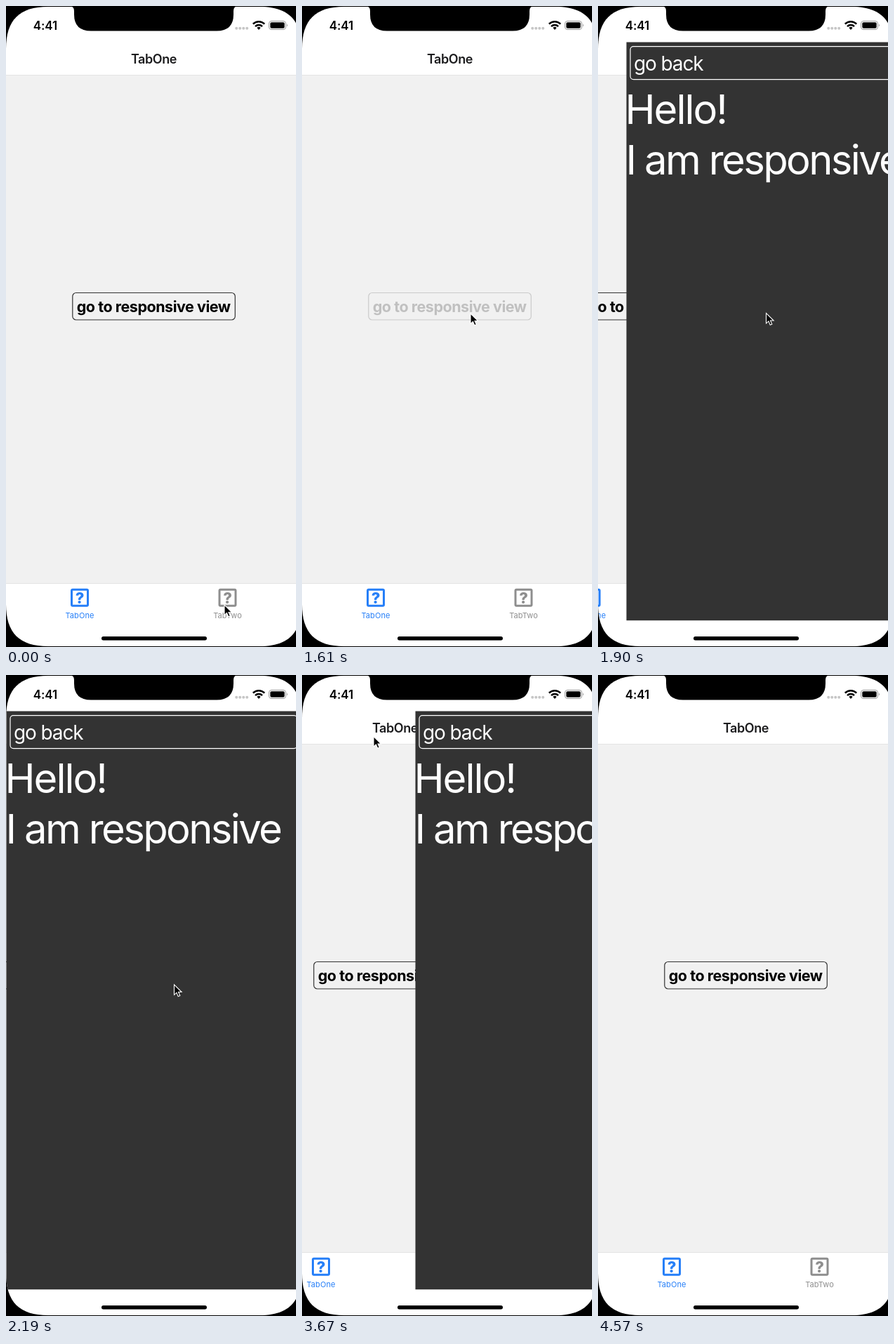
Write an HTML page that moves like this. It is 413 px wide and 913 px high and loops after 4.87 s.

```html
<!DOCTYPE html>
<html lang="en">
<head>
<meta charset="utf-8">
<title>Tab navigation</title>
<style>
  html, body { margin: 0; width: 100%; height: 100%; overflow: hidden; background: #000; }
  svg { display: block; width: 413px; height: 913px; }
  text { font-family: Inter, "Liberation Sans", sans-serif; font-optical-sizing: none; white-space: pre; }
  .mid { text-anchor: middle; }
  .title { font-size: 18px; font-weight: 600; letter-spacing: -.4px; fill: #1c1c1e; }
  .clock { font-size: 17px; font-weight: 600; letter-spacing: -.1px; }
  .label { font-size: 11px; letter-spacing: .08px; }
  .mark { font-size: 22px; font-weight: 800; }
  .link { font-size: 21.5px; font-weight: 700; letter-spacing: -.47px; }
  .back { font-size: 28px; letter-spacing: -1.1px; }
  .big { font-size: 58px; }
  .tab { fill: #8e8e8e; color: #8e8e8e; }
  .tab.on { fill: #267ff8; color: #267ff8; }
  .tab rect { fill: none; stroke: currentColor; stroke-width: 3; }
</style>
</head>
<body>
<svg viewBox="0 0 413 913">
  <defs>
    <clipPath id="screen">
      <path d="M0 61c0-41 19-60 60-60h301c41 0 60 19 60 60v791c0 41-19 60-60 60h-301c-41 0-60-19-60-60z"/>
    </clipPath>
  </defs>
  <rect width="413" height="913"/>
  <g clip-path="url(#screen)">
    <rect width="421" height="913" fill="#fff"/>

    <g id="page">
      <rect y="98" width="421" height="725" fill="#f1f1f1"/>
      <path d="M0 98.5H421M0 822.5H421" stroke="#e4e4e4"/>
      <text id="title" class="title mid" x="210.5" y="82">TabOne</text>
      <g id="link">
        <rect x="94.8" y="408.5" width="231.5" height="38.5" rx="5" fill="none" stroke="#333" stroke-width="1.2"/>
        <text class="link mid" x="210.2" y="435.5">go to responsive view</text>
      </g>
      <g class="tab">
        <rect x="93.5" y="831.3" width="23" height="23" rx="1.5"/>
        <text class="mark mid" x="105" y="850.8">?</text>
        <text class="label mid" x="105" y="872.3">TabOne</text>
      </g>
      <g class="tab">
        <rect x="304" y="831.3" width="23" height="23" rx="1.5"/>
        <text class="mark mid" x="315.5" y="850.8">?</text>
        <text class="label mid" x="315.5" y="872.3">TabTwo</text>
      </g>
    </g>

    <g id="card" fill="#fff">
      <rect x=".5" y="51.5" width="421" height="823.7" fill="#333"/>
      <rect x="6" y="57.6" width="408.5" height="47" rx="4.5" fill="none" stroke="#fff" stroke-width="1.2"/>
      <text class="back" x="11" y="91.5">go back</text>
      <text class="big" x="-1.5" y="168" letter-spacing="-2">Hello!</text>
      <text class="big" x="-.5" y="240" letter-spacing="-2.65">I am responsive</text>
    </g>
  </g>

  <path d="M90 0q7 0 7 7v5q0 23.5 24 23.5h179q24 0 24-23.5v-5q0-7 7-7z"/>
  <text class="clock mid" x="56" y="33.9">4:41</text>
  <g fill="#c6c6c6">
    <circle cx="328.2" cy="31.8" r="2"/><circle cx="333.2" cy="31.8" r="2"/>
    <circle cx="338.2" cy="31.8" r="2"/><circle cx="343.2" cy="31.8" r="2"/>
  </g>
  <path d="M351.8 25.7a11.5 11.5 0 0 1 16.4 0M355 29.2a7 7 0 0 1 10 0" fill="none" stroke="#000" stroke-width="2.5"/>
  <path d="M357.4 31a3.8 3.8 0 0 1 5.2 0l-2.6 3z"/>
  <rect x="374.5" y="21.5" width="24" height="12" rx="3.5" fill="none" stroke="#999"/>
  <rect x="376.3" y="23.3" width="20.4" height="8.4" rx="2"/>
  <path d="M400 25.5q2 2 0 4z" fill="#999"/>
  <rect x="136" y="898" width="150" height="5.4" rx="2.7"/>
  <path id="cursor" d="M0 0V14.6L3.4 11.4L5.7 16.8L8.3 15.7L6 10.5H10.6Z" stroke="#fff" stroke-width="1.1"/>
</svg>
<script>
const LOOP = 4870, WIDTH = 421;
const PUSH = 12, POP = 25;
const $ = id => document.getElementById(id);
const page = $("page"), card = $("card"), link = $("link"), title = $("title"), cursor = $("cursor");
const tabs = document.querySelectorAll(".tab");

// pointer stops: step, x, y
const stops = [
  [0, 311, 853], [3, 311, 853], [6, 108, 853], [7, 106, 852],
  [9, 190, 560], [10, 236, 450], [11, 240, 438], [13, 239.5, 437.5],
  [15, 239.5, 441], [18, 239.5, 443], [20, 225, 400], [22, 135, 165],
  [23, 104, 95], [24, 99, 82], [26, 105, 93], [27, 108, 97],
  [28, 150, 230], [30, 315, 895], [31, 320, 940]
];

// the picture advances in held steps
const stepAt = t => t < 2490
  ? Math.min(16, Math.floor((t + 6) / 146))
  : Math.min(31, 17 + Math.floor((t - 2484) / 148));

function pointer(step) {
  const i = Math.max(1, stops.findIndex(s => s[0] >= step));
  const [a, x0, y0] = stops[i - 1], [b, x1, y1] = stops[i];
  const f = (step - a) / (b - a);
  return [x0 + (x1 - x0) * f, y0 + (y1 - y0) * f];
}

const settle = n => Math.floor(260 * 0.154 ** n);

function cardX(step) {
  if (step < PUSH) return WIDTH;
  return step < POP ? settle(step - PUSH) : WIDTH - settle(step - POP);
}

const move = (el, x, y = 0) => el.setAttribute("transform", `translate(${x.toFixed(2)} ${y.toFixed(2)})`);

let last = -1;
function draw(now) {
  const step = stepAt(now % LOOP);
  if (step !== last) {
    last = step;
    const x = cardX(step), second = step >= 1 && step < 7;
    move(card, x);
    move(page, -0.3 * (WIDTH - x));
    move(cursor, ...pointer(step));
    title.textContent = second ? "TabTwo" : "TabOne";
    tabs[0].classList.toggle("on", !second);
    tabs[1].classList.toggle("on", second);
    link.setAttribute("opacity", step === 11 ? 0.2 : step === 12 ? 0.6 : 1);
  }
  requestAnimationFrame(draw);
}
draw(performance.now());
</script>
</body>
</html>
```
